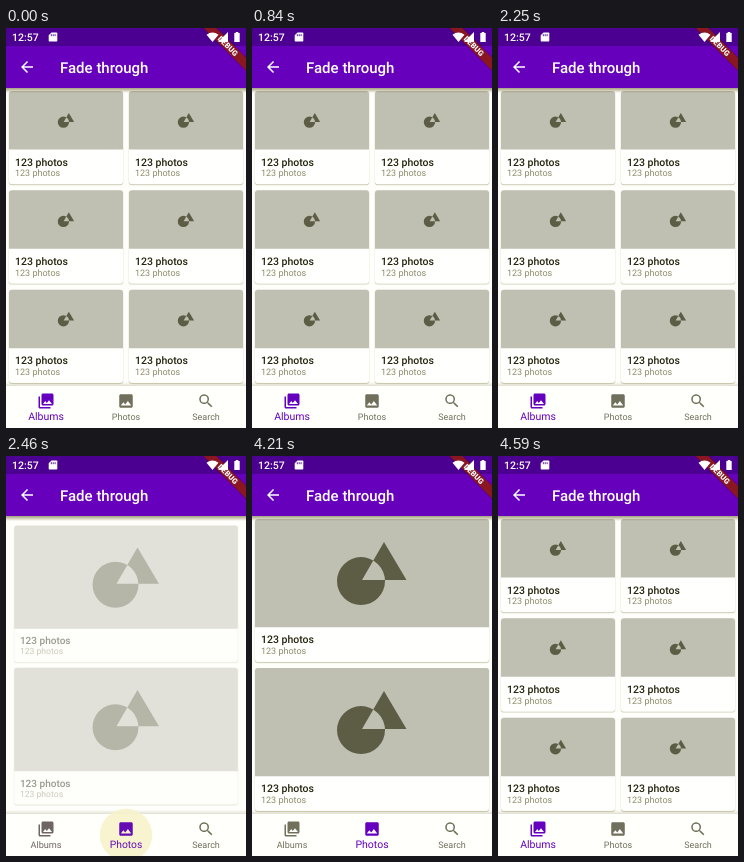
These frames come from a looping animation (240 by 400 pixels, 6170 ms). An HTML page:

```html
<!DOCTYPE html>
<html lang="en">
<head>
<meta charset="utf-8">
<title>Fade through</title>
<style>
  html, body { margin: 0; width: 100%; height: 100%; overflow: hidden; background: #fefefa; }
  svg { display: block; width: 240px; height: 400px; }
  text { font-family: Roboto, Arial, sans-serif; text-rendering: geometricPrecision; }
</style>
</head>
<body>
<svg id="stage" viewBox="0 0 240 400"></svg>
<script>
const LOOP = 6170;
// Each tap: finger down, finger up, tab it selects (0 albums, 1 photos).
const TAPS = [
  { down: 2250, up: 2335, tab: 1 },
  { down: 4210, up: 4285, tab: 0 }
];
const FADE = 300, NAV = 200, RIPPLE_OUT = 300;
const GREY = [112, 112, 92], PURPLE = [100, 0, 190];

const ICONS = {
  back: 'M20 11H7.83l5.59-5.59L12 4l-8 8 8 8 1.41-1.41L7.83 13H20z',
  albums: 'M22 16V4c0-1.1-.9-2-2-2H8c-1.1 0-2 .9-2 2v12c0 1.1.9 2 2 2h12c1.1 0 2-.9 2-2zm-11-4l2.03 2.71L16 11l4 5H8zM2 6v14c0 1.1.9 2 2 2h14v-2H4V6z',
  photos: 'M21 19V5c0-1.1-.9-2-2-2H5c-1.1 0-2 .9-2 2v14c0 1.1.9 2 2 2h14c1.1 0 2-.9 2-2zM8.5 13.5l2.5 3.01L14.5 12l4.5 6H5z',
  search: 'M15.5 14h-.79l-.28-.27A6.5 6.5 0 1 0 13.73 14.43l.27.28v.79l5 4.99L20.49 19zM9.5 14a4.5 4.5 0 1 1 0-9 4.5 4.5 0 0 1 0 9z'
};

const icon = (name, cx, cy, fill) =>
  `<path d="${ICONS[name]}" fill="${fill}" transform="translate(${cx - 9} ${cy - 9}) scale(.75)"/>`;

const label = (x, y, size, fill, str, extra = '') =>
  `<text x="${x}" y="${y}" font-size="${size}" fill="${fill}" ${extra}>${str}</text>`;

// Circle and triangle, with their overlap cut out.
const shapes = (cx, cy, s) =>
  `<path transform="translate(${cx} ${cy}) scale(${s})" fill="#5d5d46" fill-rule="evenodd"
    d="M-35 8a24 24 0 1 0 48 0a24 24 0 1 0 -48 0zM12 -31L34.5 7H-10z"/>`;

function card(x, y, w, h, s) {
  const imgH = h - 34.8, bottom = y + h;
  return `<rect x="${x - .5}" y="${y}" width="${w + 1}" height="${h + 1.2}" rx="3.2" fill="#77773a" opacity=".14"/>
    <rect x="${x}" y="${y + .5}" width="${w}" height="${h + .2}" rx="3" fill="#77773a" opacity=".3"/>
    <rect x="${x}" y="${y}" width="${w}" height="${h}" rx="3" fill="#fffffd"/>
    <path d="M${x} ${y + imgH}v${3 - imgH}a3 3 0 0 1 3 -3h${w - 6}a3 3 0 0 1 3 3v${imgH - 3}z" fill="#bfbfb2"/>
    ${shapes(x + w / 2, y + imgH / 2, s)}
    ${label(x + 6, bottom - 18.8, 10.5, '#24240f', '123 photos', 'font-weight="500"')}
    ${label(x + 6, bottom - 8, 9, '#8c8c6c', '123 photos')}`;
}

function grid(cols, rows, s) {
  const w = 240 / cols, h = 298 / rows;
  let out = '';
  for (let r = 0; r < rows; r++)
    for (let c = 0; c < cols; c++)
      out += card(c * w + 3, 60 + r * h + 3, w - 6, h - 6, s);
  return out;
}

const fade = (id, from, to, y1, y2) =>
  `<linearGradient id="${id}" x1="0" y1="${y1}" x2="0" y2="${y2}">
    <stop stop-color="#4a4200" stop-opacity="${from}"/>
    <stop offset="1" stop-color="#4a4200" stop-opacity="${to}"/></linearGradient>`;

const tabs = ['Albums', 'Photos', 'Search'];

document.getElementById('stage').innerHTML = `
  <defs>${fade('under', .5, 0, 0, 1)}${fade('over', 0, .16, 0, 1)}</defs>
  <rect width="240" height="400" fill="#fefefa"/>
  <g class="page">${grid(2, 3, .235)}</g>
  <g class="page">${grid(1, 2, 1)}</g>
  <rect y="60" width="240" height="5" fill="url(#under)"/>
  <rect y="354" width="240" height="4" fill="url(#over)"/>
  <rect y="358" width="240" height="42" fill="#fffffc"/>
  <circle id="ripple" cy="379" r="26.25" fill="#f7f3cb"/>
  ${tabs.map((t, i) => `<g class="tab">${icon(t.toLowerCase(), 40 + 80 * i, 373, 'inherit')}
    <text x="${40 + 80 * i}" y="392" text-anchor="middle">${t}</text></g>`).join('')}
  <rect width="240" height="60" fill="#6600bc"/>
  <rect width="240" height="18" fill="#4c0091"/>
  ${icon('back', 21, 39, '#fff')}
  ${label(54, 44.6, 15, '#fff', 'Fade through', 'font-weight="500"')}
  <g transform="translate(240 0) rotate(45) scale(.75)">
    <rect x="-60" y="27" width="120" height="14" fill="#200010" opacity=".25"/>
    <rect x="-60" y="28" width="120" height="12" fill="#8a1622"/>
    ${label(0, 37.7, 10.2, '#fff', 'DEBUG', 'font-weight="900" text-anchor="middle"')}
  </g>
  ${label(6, 13, 10.5, '#fff', '12:57', 'font-weight="500"')}
  <g fill="#fff">
    <path d="M45.5 4.5h5q.8 0 .8 .8v7.4q0 .8 -.8 .8h-7q-.8 0 -.8 -.8v-5.4z"/>
    <path d="M45.3 6.2v2M47.2 6.2v2M49.1 6.2v2" stroke="#4c0091" stroke-width=".9"/>
    <path d="M200.5 6.8Q206.5 2.2 212.5 6.8L206.5 14z"/>
    <path d="M222 4v10h-10z"/>
    <path d="M228.3 5h1.4v-1h2.6v1h1.4v9h-5.4z"/>
  </g>`;

const pages = document.querySelectorAll('.page');
const tabEls = document.querySelectorAll('.tab');
const ripple = document.getElementById('ripple');

const clamp = v => Math.min(1, Math.max(0, v));

// Cubic bezier easing, solved by bisection.
function bezier(x1, y1, x2, y2) {
  const at = (a, b, s) => 3 * a * s * (1 - s) ** 2 + 3 * b * s * s * (1 - s) + s ** 3;
  return x => {
    if (x <= 0 || x >= 1) return clamp(x);
    let lo = 0, hi = 1;
    for (let i = 0; i < 24; i++) {
      const mid = (lo + hi) / 2;
      if (at(x1, x2, mid) < x) lo = mid; else hi = mid;
    }
    return at(y1, y2, lo);
  };
}
const easeIn = bezier(.4, 0, 1, 1);
const easeOut = bezier(0, 0, .2, 1);
const standard = bezier(.4, 0, .2, 1);

function showPage(el, opacity, scale) {
  el.setAttribute('opacity', opacity);
  el.setAttribute('display', opacity > 0 ? 'inline' : 'none');
  el.setAttribute('transform', `translate(120 209) scale(${scale}) translate(-120 -209)`);
}

function showTab(el, k) {
  const mix = GREY.map((g, i) => Math.round(g + (PURPLE[i] - g) * k));
  el.setAttribute('fill', `rgb(${mix})`);
  el.lastElementChild.setAttribute('font-size', 9 + 1.5 * k);
}

function draw(t) {
  const tap = TAPS.filter(p => t >= p.down).pop() || { down: -1e4, up: -1e4, tab: 0 };
  const next = tap.tab, prev = 1 - next;

  const p = clamp((t - tap.up) / FADE);
  const enter = easeOut(clamp((p - .3) / .7));
  showPage(pages[prev], 1 - easeIn(clamp(p / .3)), 1);
  showPage(pages[next], enter, .92 + .08 * enter);

  const k = standard(clamp((t - tap.up) / NAV));
  showTab(tabEls[next], k);
  showTab(tabEls[prev], 1 - k);
  showTab(tabEls[2], 0);

  const press = clamp((t - tap.down) / 100);
  const release = clamp((t - tap.up - 100) / (RIPPLE_OUT - 100));
  ripple.setAttribute('cx', 40 + 80 * next);
  ripple.setAttribute('opacity', press * (1 - release));
}

const start = performance.now();
function tick() {
  draw((performance.now() - start) % LOOP);
  requestAnimationFrame(tick);
}
tick();
</script>
</body>
</html>
```
